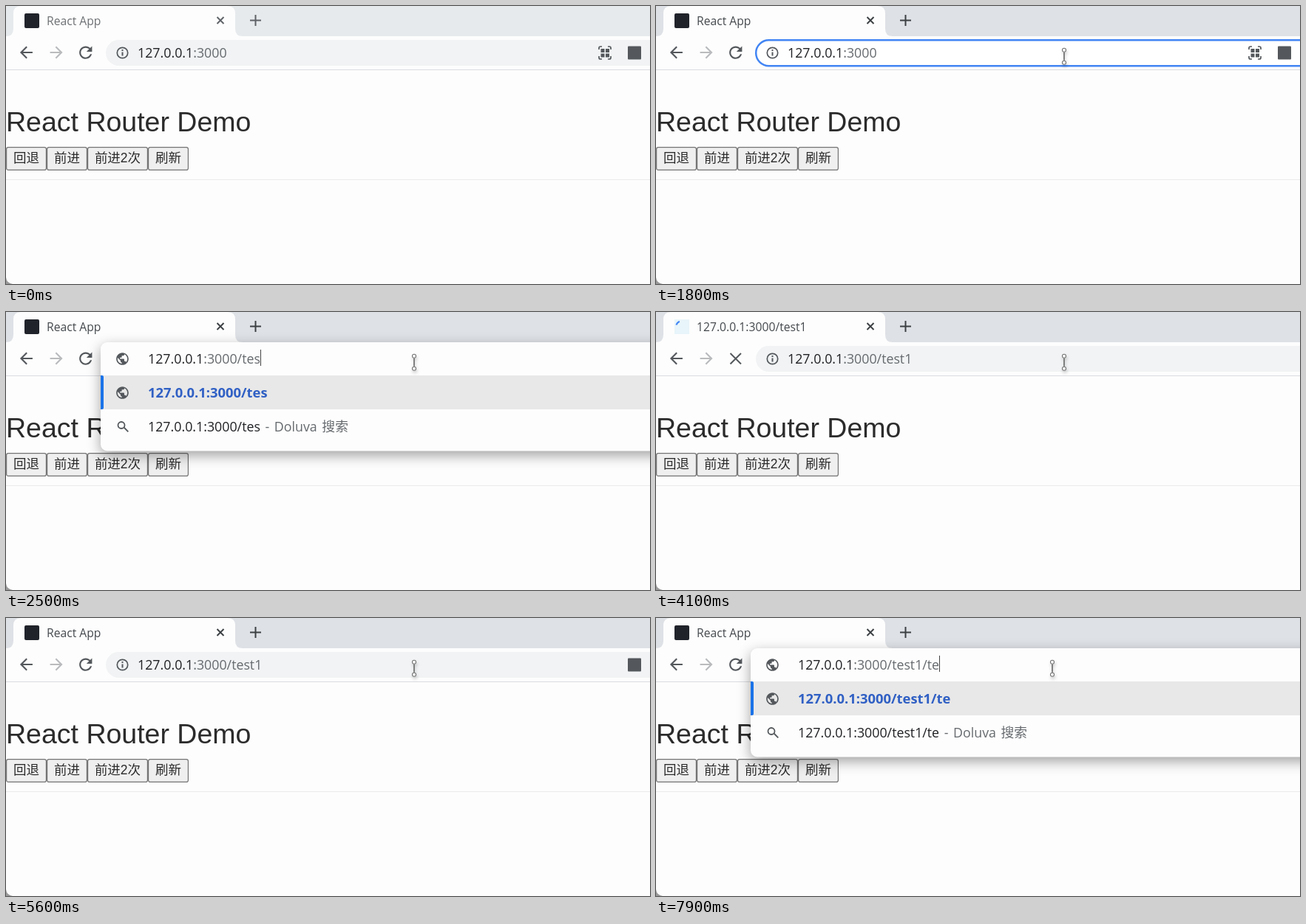
These frames come from a looping animation (871x377 px, 8000 ms). An HTML page:

```html
<!DOCTYPE html>
<html lang="zh">
<head>
<meta charset="utf-8">
<title>Router demo</title>
<style>
  html, body { margin: 0; width: 100%; height: 100%; overflow: hidden; background: #fdfdfd; }
  svg { display: block; }
  text { font: 17.8px "Open Sans", "Noto Sans CJK SC", "Noto Sans CJK", sans-serif; fill: #202124; }
  .page text { font: 17.5px "Liberation Sans", "Noto Sans CJK SC", "Noto Sans CJK", Arial, sans-serif; fill: #2b2b2b; }
  .page .head { font-size: 37.5px; }
  .page rect { fill: #efefef; stroke: #737373; stroke-width: 1.2; }
  #title { font-size: 15.7px; }
  #pick { font-size: 18.4px; font-weight: 700; fill: #3060c4; }
  .dim { fill: #666a6e; }
  .gap { word-spacing: 2px; }
  .link { fill: #3060c4; }
  .line { fill: none; stroke: #54585c; stroke-width: 2; }
  .icon { fill: #54585c; }
  .panel { fill: #fdfdfd; filter: drop-shadow(0 6px 9px rgba(0, 0, 0, .36)); }
</style>
</head>
<body>
<svg width="871" height="377" viewBox="0 0 871 377">
  <defs>
    <path id="arrow" d="M20 11H7.83l5.59-5.59L12 4l-8 8 8 8 1.41-1.41L7.83 13H20z"/>
    <path id="globe" transform="translate(-10 -10) scale(.83)" d="M12 2C6.48 2 2 6.48 2 12s4.48 10 10 10 10-4.48 10-10S17.52 2 12 2zm-1 17.93c-3.95-.49-7-3.85-7-7.93 0-.62.08-1.21.21-1.79L9 15v1c0 1.1.9 2 2 2v1.93zm6.9-2.54c-.26-.81-1-1.39-1.9-1.39h-1v-3c0-.55-.45-1-1-1H8v-2h2c.55 0 1-.45 1-1V7h2c1.1 0 2-.9 2-2v-.41c2.93 1.19 5 4.06 5 7.41 0 2.08-.8 3.97-2.1 5.39z"/>
  </defs>

  <g class="page" id="page">
    <text class="head" y="169.5">React Router Demo</text>
    <path d="M0 235.5H871" stroke="#ebebeb"/>
    <path d="M0 368Q1 376 9 377H0z" fill="#999"/>
  </g>

  <!-- tab strip -->
  <rect id="strip" width="871" height="41"/>
  <path d="M0 41Q10 41 10 31V10Q10 0 20 0H300Q310 0 310 10V31Q310 41 320 41z" fill="#fdfdfd"/>
  <rect id="favicon" x="25" y="10" width="20" height="20" rx="2" fill="#20232a"/>
  <g id="loading">
    <rect x="25" y="10" width="20" height="20" fill="#e8f5fa"/>
    <path id="spinner" d="M35 12A8 8 0 0 1 41 14.7" fill="none" stroke="#4285f4" stroke-width="2.2"/>
  </g>
  <text id="title" x="55" y="25.7"></text>
  <path id="tabIcons" class="line" d="M285.5 15l9 9m0-9l-9 9M330 19.5h15m-7.5-7.5v15"/>

  <!-- toolbar -->
  <rect y="41" width="871" height="45" fill="#fdfdfd"/>
  <path d="M0 86.5H871" stroke="#dadce0"/>
  <use href="#arrow" class="icon" transform="translate(14.7 50.3) scale(1.06)"/>
  <use href="#arrow" fill="#b9bbbd" transform="translate(80.8 50.3) scale(-1.06 1.06)"/>
  <path id="reload" class="icon" transform="translate(94.8 50.2) scale(1.08)" d="M17.65 6.35C16.2 4.9 14.21 4 12 4c-4.42 0-7.99 3.58-7.99 8s3.57 8 7.99 8c3.73 0 6.84-2.55 7.73-6h-2.08c-.82 2.33-3.04 4-5.65 4-3.31 0-6-2.69-6-6s2.69-6 6-6c1.66 0 3.14.69 4.22 1.78L13 11h7V4z"/>
  <path id="stop" class="line" d="M100.5 56l14.5 14.5m0-14.5l-14.5 14.5"/>
  <rect id="pill" x="135" y="46" width="800" height="35" rx="17.5" fill="#f1f3f4"/>
  <rect id="ring" x="135.2" y="46.2" width="800" height="35" rx="17.5" fill="#fff" stroke="#4285f4" stroke-width="2.5"/>
  <g id="info">
    <circle class="line" cx="157.5" cy="63.5" r="7.2" style="stroke-width:1.7"/>
    <path class="line" d="M157.5 62.5v5m0-8.5v2"/>
  </g>
  <g id="scan">
    <path class="line" style="stroke-width:1.7" d="M802 59v-2q0-2 2-2h2m8 0h2q2 0 2 2v2m0 9v2q0 2-2 2h-2m-8 0h-2q-2 0-2-2v-2"/>
    <path class="icon" d="M804.5 58h5v5h-5zm6.5 0h5v5h-5zm-6.5 6.5h5v5h-5zm6.5 0h5v5h-5z"/>
  </g>
  <rect id="translate" class="icon" x="841" y="54.5" width="18" height="18" rx="1"/>

  <g id="drop">
    <rect id="panel" class="panel" x="128" y="41" width="800" rx="9"/>
    <rect x="128" y="86" width="743" height="46" fill="#e8e8e8"/>
    <path d="M128 86h2q2 0 2 2v42q0 2-2 2h-2z" fill="#1a73e8"/>
    <use href="#globe" class="icon" transform="translate(157.5 63.5)"/>
    <use href="#globe" class="icon" transform="translate(157.5 109.5)"/>
    <path class="line" d="M160 157l5.3 5.3M160.5 153.5a4.5 4.5 0 1 1-9 0a4.5 4.5 0 1 1 9 0" style="stroke-width:1.8"/>
    <text id="pick" x="192" y="116"></text>
    <text x="192" y="162"><tspan id="search"></tspan><tspan class="dim gap"> - Doluva 搜索</tspan></text>
    <g id="history"></g>
  </g>

  <rect id="marked" x="178" y="51" height="24" fill="#0078d7"/>
  <text id="url" y="69.7"><tspan id="host">127.0.0.1</tspan><tspan id="path" class="dim"></tspan></text>
  <rect id="caret" y="51" width="1" height="22" fill="#444"/>

  <g id="cursor" fill="#fff" stroke="#747474" stroke-width="1.1" style="filter:drop-shadow(1px 3px 2px rgba(0,0,0,.2))">
    <path d="M0-5.5V5.5" stroke-width="1.8"/>
    <circle cy="-8.5" r="2.5"/>
    <circle cy="8.5" r="2.5"/>
  </g>
</svg>
<script>
const $ = id => document.getElementById(id);
const show = (id, on) => $(id).style.display = on ? '' : 'none';
const within = (t, ...spans) => spans.some(([a, b]) => t >= a && t < b);
const latest = (t, steps) => steps.filter(s => s[0] <= t).pop()[1];
const lerp = (t, keys) => {
  const i = keys.findIndex(k => k[0] > t);
  if (i < 0) return keys[keys.length - 1][1];
  if (!i) return keys[0][1];
  const [a, x] = keys[i - 1], [b, y] = keys[i];
  return x + (y - x) * (t - a) / (b - a);
};

[['回退', 0, 55], ['前进', 55, 55], ['前进2次', 110, 82], ['刷新', 192, 55]].forEach(([label, x, w]) =>
  $('page').innerHTML += `<rect x="${x + .6}" y="191.6" width="${w - 1.2}" height="30.8" rx="2.5"/>
    <text x="${x + w / 2}" y="212.3" text-anchor="middle">${label}</text>`);

['home', 'about', 'home/news', 'home/message'].forEach((name, i) =>
  $('history').innerHTML += `<use href="#globe" class="icon" transform="translate(157.5 ${201.5 + 46 * i})"/>
    <text x="192" y="${208 + 46 * i}">React App<tspan class="dim"> - </tspan><tspan class="link">127.0.0.1:3000/${name}</tspan></text>`);

const typed = [[0, ''], [2000, '/'], [2200, '/t'], [2300, '/te'], [2500, '/tes'], [2700, '/test'],
  [3100, '/test1'], [7600, '/test1/'], [7800, '/test1/t'], [7900, '/test1/te']];

function draw(t) {
  const active = t >= 200;
  const open = within(t, [2000, 4100], [7600, 8000]);
  const tall = within(t, [2000, 2200]);
  const focused = within(t, [800, 2000], [6000, 7600]);
  const selected = within(t, [800, 1200], [6000, 6300]);
  const busy = within(t, [4100, 5000]);
  const loading = within(t, [4100, 5600]);
  const route = ':3000' + latest(t, typed);

  $('strip').setAttribute('fill', active ? '#dee1e6' : '#e7eaed');
  $('title').textContent = busy ? '127.0.0.1:3000/test1' : 'React App';
  $('title').style.fill = active ? '#45494d' : '#6d7073';
  $('tabIcons').style.stroke = active ? '#3c4043' : '#5f6368';
  show('favicon', !loading);
  show('loading', loading);
  show('spinner', t < 5400);
  $('spinner').setAttribute('transform', `rotate(${(t - 4300) * .36} 35 20)`);
  show('reload', !busy);
  show('stop', busy);

  show('ring', focused);
  show('pill', !focused && !open);
  show('info', !open);
  show('scan', !open && !within(t, [4100, 6000]));
  show('translate', !open && !within(t, [4100, 5400]));

  show('drop', open);
  show('history', tall);
  $('panel').setAttribute('height', tall ? 400 : 147.5);
  $('pick').textContent = $('search').textContent = '127.0.0.1' + route;

  const x = open ? 192 : 178;
  $('url').setAttribute('x', x);
  $('path').textContent = route;
  $('host').style.fill = $('path').style.fill = selected ? '#fff' : '';
  const width = $('url').getComputedTextLength();
  show('marked', selected);
  $('marked').setAttribute('width', width);
  show('caret', within(t, [1300, 1800], [2000, 3600], [6300, 6800], [7200, 8000]));
  $('caret').setAttribute('x', Math.round(x + width));

  show('cursor', t >= 700);
  const cx = lerp(t, [[700, 564], [1100, 564], [1300, 552], [5800, 552], [6000, 536]]);
  $('cursor').setAttribute('transform', `translate(${cx} 68.2)`);
}

const start = performance.now();
function tick(now) {
  draw(Math.floor(Math.max(0, now - start) % 8000 / 100) * 100);
  requestAnimationFrame(tick);
}
draw(0);
requestAnimationFrame(tick);
</script>
</body>
</html>
```
